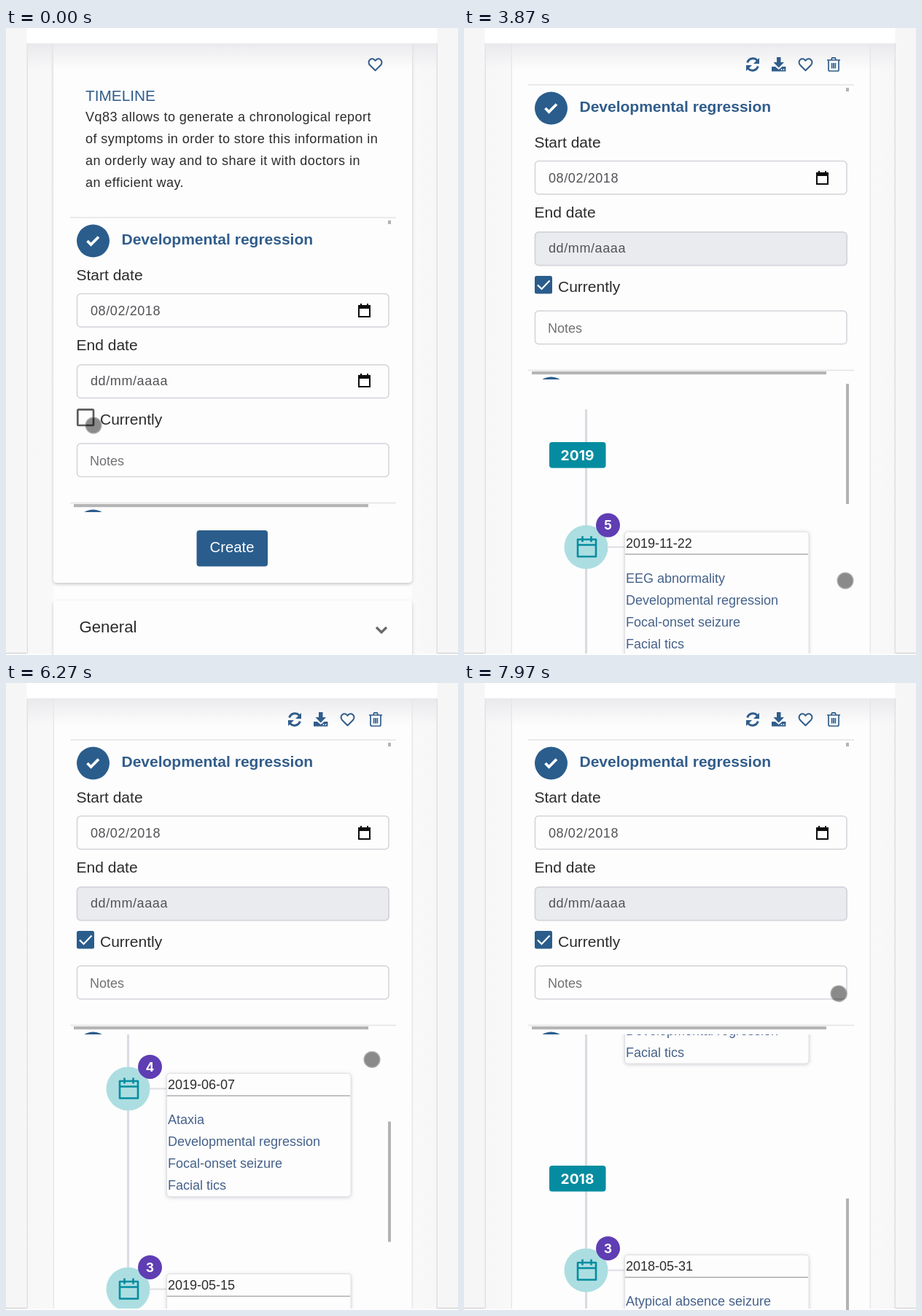
These frames come from a looping animation (620x860 px, 8000 ms). An HTML page:

```html
<!DOCTYPE html>
<html lang="en">
<head>
<meta charset="utf-8">
<title>Symptom timeline</title>
<style>
  html, body { margin: 0; width: 100%; height: 100%; overflow: hidden; background: #fdfdfd; }
  svg { display: block; width: 620px; height: 860px; font-family: "Liberation Sans", Arial, sans-serif; }
  .num { font-family: Inter, Roboto, sans-serif; font-weight: 700; fill: #fff; text-anchor: middle; }
</style>
</head>
<body>
<svg id="stage" viewBox="0 0 620 860" xmlns="http://www.w3.org/2000/svg"></svg>
<script>
const LOOP = 8000, CHECKED = 140, CREATED = 2800, SHIFT = -182;
const INK = '#2b2b2d', SOFT = '#525257', BLUE = '#2a5d8c', SLATE = '#315d8b', TEAL = '#058ca0';
const EDGE = '#d3d3da', PALE = '#f6f6f7', PAPER = '#fdfdfd';

const text = (x, y, s, size = 18, fill = INK, more = '') =>
  `<text x="${x}" y="${y}" font-size="${size}" fill="${fill}" ${more}>${s}</text>`;
const rect = (x, y, w, h, fill, more = '') =>
  `<rect x="${x}" y="${y}" width="${w}" height="${h}" fill="${fill}" ${more}/>`;
const circle = (x, y, r, fill) => `<circle cx="${x}" cy="${y}" r="${r}" fill="${fill}"/>`;
const path = (d, stroke, width = 2, more = '') =>
  `<path d="${d}" fill="none" stroke="${stroke}" stroke-width="${width}" ${more}/>`;
const group = (id, body, more = '') => `<g id="${id}" ${more}>${body}</g>`;

const fade = (id, dir, color, from, to) =>
  `<linearGradient id="${id}" ${dir}><stop stop-color="${color}" stop-opacity="${from}"/>` +
  `<stop offset="1" stop-color="${color}" stop-opacity="${to}"/></linearGradient>`;

const defs = `<defs>
  ${fade('down', 'x2="0" y2="1"', '#e6e6ea', .8, 0)}
  ${fade('left', '', '#ececef', .35, .25)}
  ${fade('right', '', '#ececef', .25, .35)}
  <filter id="shade" x="-10%" y="-10%" width="120%" height="125%">
    <feDropShadow dx="0" dy="2" stdDeviation="2" flood-color="#8e8e98" flood-opacity=".5"/>
  </filter>
  <filter id="glow" x="-10%" y="-10%" width="120%" height="120%">
    <feDropShadow dx="0" dy="1" stdDeviation="2.5" flood-color="#9c9ca8" flood-opacity=".45"/>
  </filter>
  <clipPath id="listClip"><rect x="66" y="482" width="490" height="376"/></clipPath>
  <clipPath id="rowClip"><rect x="88" y="655" width="60" height="9"/></clipPath>
</defs>`;

function backdrop() {
  return rect(0, 0, 620, 860, PAPER) +
    rect(0, 0, 28.5, 857, PALE) + rect(591.5, 0, 29, 857, PALE) +
    rect(29, 21, 36, 837, 'url(#left)') + rect(557, 21, 34, 837, 'url(#right)') +
    rect(28.5, 21, 1.5, 837, '#e0e0e3') + rect(590.5, 21, 1.5, 837, '#e0e0e3') +
    rect(0, 857, 28, 1, '#c9c9cc') + rect(592, 857, 28, 1, '#c9c9cc');
}

const topShadow = rect(29, 21, 562, 36, 'url(#down)');

function heart(x) {
  return path(`M${x} 58.3l-7.3-7.3c-5-5.4 2.5-12.6 7.3-6.2c4.8-6.4 12.3.8 7.3 6.2z`, SLATE, 2, 'stroke-linejoin="round"');
}

function tools() {
  const sync = path('M388.7 47.5a8 8 0 0 1 13.6-3M403.3 52.5a8 8 0 0 1-13.6 3', SLATE, 3) +
    `<path d="M405 41v8h-8zM387 59v-8h8z" fill="${SLATE}"/>`;
  const save = `<path d="M429 40h5.500v7h4.500l-7.300 7.500-7.300-7.500h4.600zM422 53h5l4.700 4 4.700-4h5v6.500h-19.400z" fill="${SLATE}"/>` +
    circle(435.5, 57, .9, '#fff') + circle(438.6, 57, .9, '#fff');
  const bin = path('M498 44h18M503.500 44l1.500-3.200h4l1.500 3.200M500 44v13q0 2 2 2h10q2 0 2-2v-13M504.600 48v7.500M507 48v7.500M509.400 48v7.500', SLATE, 1.7);
  return sync + save + heart(468.5) + bin;
}

function calendarMark(y) {
  return path(`M484 ${y - 7}h15v15h-15z`, '#0c0c0c', 2) + rect(483, y - 8, 17, 5, '#0c0c0c') +
    rect(486, y - 10, 2, 3, '#0c0c0c') + rect(495, y - 10, 2, 3, '#0c0c0c');
}

const field = (y, fill = PAPER) =>
  rect(97.5, y, 427.5, 45.5, fill, `rx="5" stroke="${EDGE}" stroke-width="1.5"`);

function form() {
  const spaced = 'letter-spacing=".6"';
  return path('M88 260h447', '#e4e4e6', 1.3) +
    rect(524, 264, 4, 5, '#b4b4b4') +
    circle(119.5, 292, 22.5, BLUE) +
    path('M111.500 292l5 5 10.500-10.500', '#fff', 3.8) +
    text(158.5, 297, 'Developmental regression', 21, SLATE, 'font-weight="700"') +
    text(96.5, 346, 'Start date', 21) +
    field(364.5) + text(116, 394, '08/02/2018', 18, SOFT, spaced) + calendarMark(388) +
    text(96.5, 442, 'End date', 21) +
    field(462) +
    group('open', calendarMark(484)) +
    group('closed', field(462, '#e9ebee')) +
    text(116, 490, 'dd/mm/aaaa', 18, SOFT, spaced) +
    group('empty', rect(98.3, 523.3, 21.7, 21.7, PAPER, 'rx="1.500" stroke="#5c5c5e" stroke-width="2.700"')) +
    group('ticked', rect(97, 522, 24, 24.5, BLUE, 'rx="2.500"') + path('M101 534.500l5.500 5.500 11-11.500', '#fff', 2.2)) +
    text(129, 543.5, 'Currently', 21) +
    field(570) + text(115, 600, 'Notes', 18, '#727276') +
    path('M88 651.500h447', '#e2e2e4', 1.4) +
    rect(93, 653, 404, 4.2, '#b5b5b5') +
    `<g clip-path="url(#rowClip)">${circle(119.5, 683, 22.5, BLUE)}</g>`;
}

function before() {
  const lines = ['Vq83 allows to generate a chronological report',
    'of symptoms in order to store this information in',
    'an orderly way and to share it with doctors in', 'an efficient way.'];
  return rect(65, 10, 492, 751, PAPER, 'rx="5" filter="url(#shade)"') +
    rect(65, 785, 492, 90, PAPER, 'rx="5" filter="url(#shade)"') +
    rect(29, 0, 562, 21, '#fff') + topShadow + heart(506.5) +
    text(109, 100, 'TIMELINE', 20.8, SLATE) +
    lines.map((s, i) => text(109, 128 + 30 * i, s, 18, INK, 'letter-spacing=".45"')).join('') +
    rect(261.5, 689, 97.5, 49.5, BLUE, 'rx="4"') +
    text(310, 719, 'Create', 20.3, '#fff', 'text-anchor="middle"') +
    text(100.5, 829, 'General', 22.2) +
    path('M508 822l7 7 7-7', '#68686c', 3.2);
}

function year(y, label) {
  return rect(117, y, 77.5, 35.5, TEAL, 'rx="4"') +
    `<text class="num" x="155.500" y="${y + 24.5}" font-size="19.200">${label}</text>`;
}

function entry(y, date, items) {
  const cy = y + 6, bottom = y + 34 + items.length * 30;
  return path(`M198 ${cy}h22`, '#dedee4', 2) +
    circle(167.5, cy, 30, '#acdee1') +
    path(`M156 ${cy - 10.5}h25v23.500h-25zM156 ${cy - 3}h25M162.500 ${cy - 15}v8M174.500 ${cy - 15}v8`, TEAL, 2.6, 'stroke-linejoin="round"') +
    circle(197.5, cy - 30, 16.5, '#5f3db3') +
    `<text class="num" x="197.500" y="${cy - 23.7}" font-size="17.500">${items.length}</text>` +
    rect(220.5, y - 15, 252.5, bottom - y + 15, PAPER, 'rx="4" stroke="#e0e0e5" filter="url(#glow)"') +
    text(222, y + 6.5, date) + rect(221, y + 15, 251, 1.4, '#a8a8aa') +
    items.map((s, i) => text(222, y + 54.7 + 30 * i, s, 18, '#45618a')).join('');
}

function after() {
  const reg = 'Developmental regression', focal = 'Focal-onset seizure', tics = 'Facial tics';
  const list = rect(166, 523, 3, 1500, '#d9dae2') +
    year(568, '2019') +
    entry(706, '2019-11-22', ['EEG abnormality', reg, focal, tics, 'Ataxia']) +
    entry(1010, '2019-06-07', ['Ataxia', reg, focal, tics]) +
    entry(1285, '2019-05-15', [focal, reg, tics]) +
    year(1549, '2018') +
    entry(1686.5, '2018-05-31', ['Atypical absence seizure', reg, tics]);
  return rect(65, 21, 492, 837, PAPER) +
    rect(64.5, 21, 1.5, 837, '#e8e8eb') + rect(556.5, 21, 1.5, 837, '#e8e8eb') +
    rect(29, 0, 562, 21, '#fff') + topShadow + tools() +
    `<g clip-path="url(#listClip)">${group('list', list)}</g>` +
    rect(524, 488, 4, 165, '#b3b3b3', 'id="thumb"');
}

const stage = document.getElementById('stage');
stage.innerHTML = defs + backdrop() + group('before', before()) + group('after', after()) +
  group('form', form()) +
  group('dot', circle(0, 0, 11.5, '#000') + '<circle r="11" fill="none" stroke="#fff" stroke-opacity=".3" stroke-width="1.500"/>');

const el = {};
stage.querySelectorAll('[id]').forEach(n => el[n.id] = n);

const ease = {
  line: u => u,
  both: u => u * u * (3 - 2 * u),
  into: u => u * (.5 + .5 * u),
  out: u => 1 - (1 - u) ** 3
};

// Keys are [time, value, easing towards this key].
function track(keys, t) {
  if (t <= keys[0][0]) return keys[0][1];
  for (let i = 1; i < keys.length; i++) {
    const [a, v] = keys[i - 1], [b, w, kind = 'line'] = keys[i];
    if (t < b) return v + (w - v) * ease[kind]((t - a) / (b - a));
  }
  return keys[keys.length - 1][1];
}

const scroll = [[3900, 0], [5220, 243, 'both'], [5530, 243], [6270, 459, 'into'],
  [6850, 566, 'out'], [7130, 566], [7970, 887, 'both']];
const bar = [[3780, 0], [3850, 1], [6880, 1], [7140, .2], [7200, 1]];

const touches = [
  { from: -90, to: 300, x: [[0, 120]], y: [[0, 545]] },
  { from: 2200, to: 2480, x: [[0, 302]], y: [[0, 724]] },
  { from: 3780, to: 5330, x: [[3900, 523], [5220, 528]], y: [[3900, 758], [5220, 603, 'both']] },
  { from: 5440, to: 6420, x: [[5530, 506], [6270, 502]], y: [[5530, 733], [6270, 517, 'into'], [6380, 497, 'out']] },
  { from: 7030, to: 8200, x: [[7130, 487], [7970, 514, 'both']], y: [[7130, 749], [7970, 426, 'both']] }
];

const show = (node, on) => node.setAttribute('display', on ? 'inline' : 'none');

function draw(t) {
  const created = t >= CREATED, checked = t >= CHECKED, pos = track(scroll, t);
  show(el.before, !created);
  show(el.after, created);
  show(el.open, !checked);
  show(el.closed, checked);
  show(el.empty, !checked);
  show(el.ticked, checked);
  el.form.setAttribute('transform', `translate(0 ${created ? SHIFT : 0})`);
  el.list.setAttribute('transform', `translate(0 ${-pos})`);
  el.thumb.setAttribute('y', 488 + pos * .247);
  el.thumb.setAttribute('opacity', track(bar, t));

  const touch = touches.find(k => t >= k.from && t < k.to);
  show(el.dot, touch);
  if (touch) {
    const alpha = Math.min(1, (t - touch.from) / 80, (touch.to - t) / 80);
    el.dot.setAttribute('opacity', .45 * alpha);
    el.dot.setAttribute('transform', `translate(${track(touch.x, t)} ${track(touch.y, t)})`);
  }
}

const start = performance.now();
function tick() {
  draw((performance.now() - start) % LOOP);
  requestAnimationFrame(tick);
}
draw(0);
requestAnimationFrame(tick);
</script>
</body>
</html>
```
